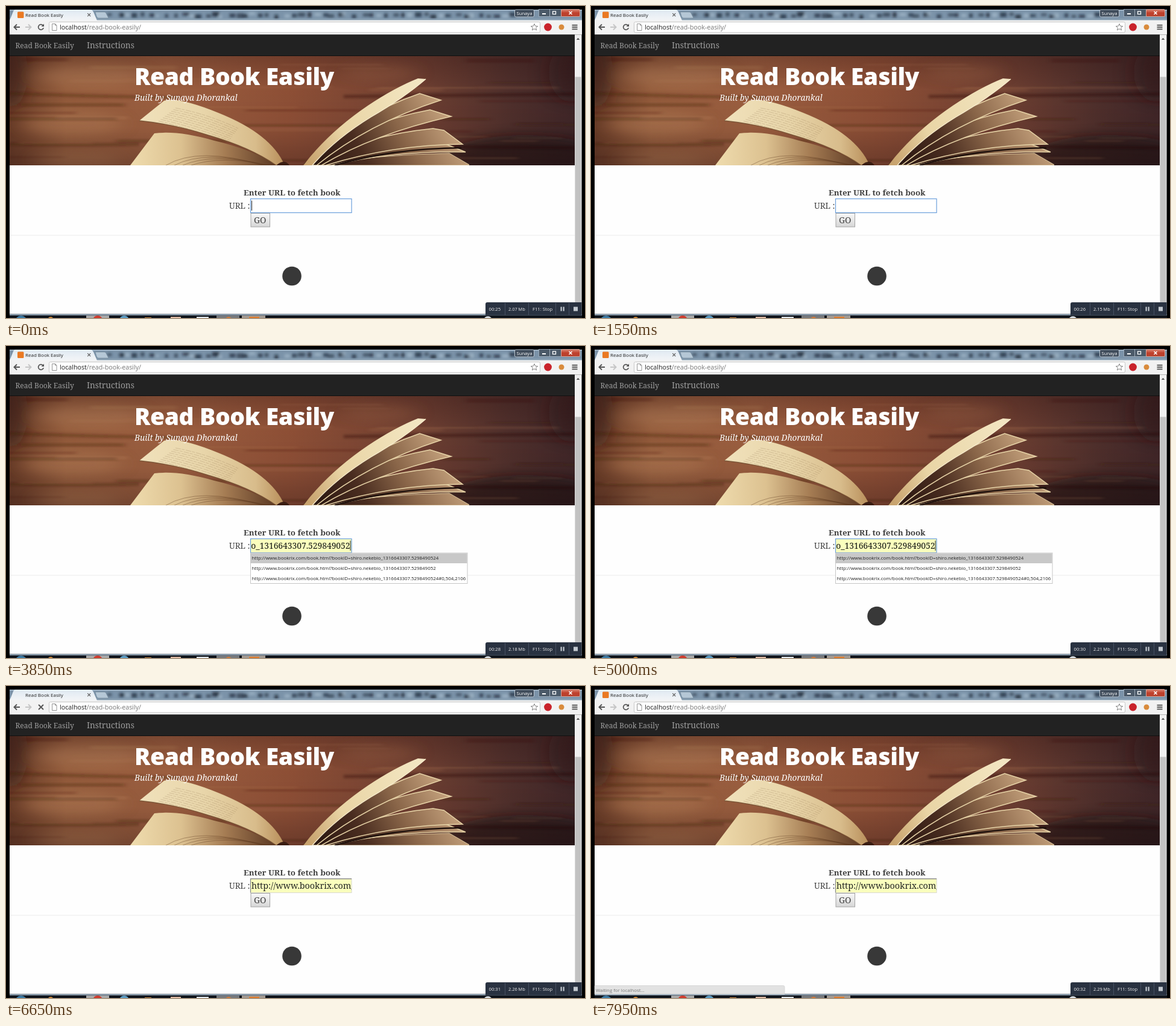
Write an HTML page that moves like this. It is 960x517 px and loops after 8000 ms.

```html
<!DOCTYPE html>
<html lang="en">
<head>
<meta charset="utf-8">
<title>Read Book Easily</title>
<style>
html, body { margin: 0; width: 100%; height: 100%; overflow: hidden; background: #000; }
svg { display: block; width: 100vw; height: 100vh; }
text { white-space: pre; }
.serif { font-family: "Noto Serif", serif; }
.ui { font-family: "Open Sans", sans-serif; }
</style>
</head>
<body>
<svg id="stage" viewBox="0 0 960 517" preserveAspectRatio="none"></svg>
<script>
const LOOP = 8000;
const $ = id => document.getElementById(id);

let seed = 11;
const rnd = () => (seed = seed * 16807 % 2147483647) / 2147483647;
const span = (a, b) => a + rnd() * (b - a);

const rect = (x, y, w, h, fill, more = '') =>
  `<rect x="${x}" y="${y}" width="${w}" height="${h}" fill="${fill}" ${more}/>`;
const disc = (x, y, r, fill) => `<circle cx="${x}" cy="${y}" r="${r}" fill="${fill}"/>`;
const blob = (x, y, rx, ry, fill, alpha) =>
  `<ellipse cx="${x}" cy="${y}" rx="${rx}" ry="${ry}" fill="${fill}" opacity="${alpha}"/>`;
const path = (d, fill, more = '') => `<path d="${d}" fill="${fill}" ${more}/>`;
const line = (d, stroke, w = 1, more = '') =>
  `<path d="${d}" fill="none" stroke="${stroke}" stroke-width="${w}" ${more}/>`;
const text = (x, y, size, str, fill, font = 'ui', more = '') =>
  `<text x="${x}" y="${y}" font-size="${size}" fill="${fill}" class="${font}" ${more}>${str}</text>`;
const grad = (id, stops, coords) =>
  `<linearGradient id="${id}" ${coords}>` + stops.map(([o, c, a = 1]) =>
    `<stop offset="${o}" stop-color="${c}" stop-opacity="${a}"/>`).join('') + '</linearGradient>';
const repeat = (n, make) => Array.from({ length: n }, (_, i) => make(i)).join('');

const across = 'x1="0" y1="0" x2="1" y2="0"';
const down = 'x1="0" y1="0" x2="0" y2="1"';
const fan = 'gradientUnits="userSpaceOnUse" x1="505" y1="264" x2="720" y2="150"';

const defs = `<defs>
  ${grad('wood', [[0, '#6a3d28'], [.1, '#935c3c'], [.28, '#9c5f40'], [.5, '#8d4f36'],
    [.72, '#704032'], [.88, '#50302c'], [1, '#3f2628']], across)}
  ${grad('dusk', [[0, '#2a1010', .28], [.3, '#2a1010', 0], [.65, '#1d0c10', .04], [1, '#1d0c10', .3]], down)}
  ${grad('leafL', [[0, '#f0e1bb'], [.45, '#e8d5a9'], [.8, '#d8bc8b'], [1, '#b78d59']], across)}
  ${grad('stackL', [[0, '#efdcae'], [.35, '#dcc190'], [.65, '#a57c53'], [1, '#5a3722']], across)}
  ${grad('leafR', [[0, '#c8a36e'], [.3, '#e9d5a5'], [1, '#f4e8c6']], fan)}
  ${grad('under', [[0, '#26140f'], [.35, '#4a2d20'], [.65, '#8a6649'], [1, '#c7a47f']], fan)}
  ${grad('button', [[0, '#f8f8f8'], [1, '#d6d6d6']], down)}
  ${grad('close', [[0, '#d98a78'], [.5, '#c0402c'], [1, '#b5412e']], down)}
  ${grad('tab', [[0, '#dfe9f2'], [1, '#f3f5f7']], down)}
  <filter id="soft"><feGaussianBlur stdDeviation="2"/></filter>
  <filter id="haze" x="-20%" y="-200%" width="140%" height="500%"><feGaussianBlur stdDeviation="5 1.2"/></filter>
  <filter id="glow" x="-50%" y="-50%" width="200%" height="200%"><feGaussianBlur stdDeviation="16 9"/></filter>
  <clipPath id="barClip"><rect x="6" y="6" width="949" height="18"/></clipPath>
  <clipPath id="photoClip"><rect x="6" y="83" width="937" height="181"/></clipPath>
  <clipPath id="fieldClip"><rect x="407" y="320" width="165.5" height="22"/></clipPath>
  <clipPath id="taskClip"><rect x="6" y="513" width="949" height="4"/></clipPath>
</defs>`;

function titleBar() {
  const blots = repeat(52, i => rect(172 + i * 13 + span(-4, 4), span(10, 15), span(5, 12), span(4, 8),
    ['#2b3a4b', '#141d29', '#a3b8ca', '#1d2938'][i % 4], 'opacity=".75"'));
  return `<g clip-path="url(#barClip)">${rect(6, 6, 949, 18, '#7b93a9')}
    <g filter="url(#soft)">${blots}</g>${rect(6, 6, 949, 1.5, '#a9bccc')}
    ${rect(6, 20.5, 949, 3.5, '#8ba1b4', 'opacity=".7"')}</g>`
  + path('M6 24 L12 9 Q13 6 16 6 H140 Q143 6 145 10 L151 24Z', 'url(#tab)')
  + path('M148 10 H163 Q165 10 166 12 L170 20 H153 Q151 20 150 17Z', '#b5c7d6', 'stroke="#6c8193" stroke-width=".6"')
  + rect(19, 9.5, 10.5, 10.5, '#ea7a24', 'id="favicon" rx="1.5"')
  + line('M28 14.5 A4 4 0 1 1 24 10.5', '#9aa6b0', 1.3, 'id="spinner"')
  + text(32, 17.5, 8, 'Read Book Easily', '#222')
  + line('M135.2 12.2 l5 5 m0 -5 l-5 5', '#555', 1.1)
  + rect(843.5, 6, 32, 12, '#3f4c5b', 'rx="2" stroke="#b9c4ce"')
  + text(859.5, 15, 7.6, 'Sunaya', '#fff', 'ui', 'text-anchor="middle"')
  + rect(883.5, 5.5, 18, 12, '#4b5a69', 'stroke="#a9b6c2" stroke-width=".8"')
  + rect(901.5, 5.5, 19, 12, '#4b5a69', 'stroke="#a9b6c2" stroke-width=".8"')
  + rect(920.5, 5.5, 31, 12, 'url(#close)', 'rx="1.5" stroke="#dcb8ae" stroke-width=".8"')
  + rect(889, 12, 6, 2, '#fff') + rect(906.5, 9, 5, 4.5, 'none', 'stroke="#fff" stroke-width="1.3"')
  + line('M933.5 9 l5 5 m0 -5 l-5 5', '#fff', 1.6);
}

function toolBar() {
  return rect(6, 23.5, 949, 24, '#f2f2f2')
  + line('M23 35 H13.5 M18 30.5 L13.5 35 L18 39.5', '#555', 1.9)
  + line('M32 35 H41.5 M37 30.5 L41.5 35 L37 39.5', '#c6c6c6', 1.9)
  + `<g id="reload">${line('M61.3 32 A4.4 4.4 0 1 0 62.2 36.3', '#555', 1.7)}${path('M63 29.5 V34 H58.5Z', '#555')}</g>`
  + line('M54 31 l8 8 m0 -8 l-8 8', '#555', 1.9, 'id="stop"')
  + rect(71.5, 26.5, 814, 17.5, '#fff', 'rx="2" stroke="#c6c6c6"')
  + line('M76.5 29.5 H81.5 L84 32 V40.5 H76.5Z M81.5 29.5 V32 H84', '#888', .9)
  + text(89, 38.6, 10.7, '<tspan fill="#222">localhost</tspan>/read-book-easily/', '#777')
  + line('M876 29.5 l1.6 3.7 4 .3 -3 2.6 1 3.9 -3.6 -2.1 -3.6 2.1 1 -3.9 -3 -2.6 4 -.3Z', '#777', .9)
  + disc(898.5, 35, 6.4, '#c9232b') + disc(921, 35, 4.5, '#d98b3c')
  + repeat(3, i => rect(938.5, 30.8 + i * 3.3, 9, 1.9, '#555'));
}

function wood() {
  const grain = repeat(40, i => rect(span(-40, 880), span(84, 262), span(60, 220), span(2, 7),
    i % 2 ? '#3e1d16' : '#c08a60', `opacity="${span(.1, .25).toFixed(2)}"`));
  const seams = line('M6 145 Q160 150 290 152 M6 229 Q120 231 220 229', '#3c1c12', 2.5, 'opacity=".65"')
    + line('M560 150 L943 146 M740 233 L943 235', '#22100f', 3, 'opacity=".6"');
  const light = blob(140, 115, 90, 18, '#c28a62', .45) + blob(110, 195, 80, 22, '#b57f57', .45)
    + blob(120, 255, 70, 12, '#b98257', .45) + blob(620, 110, 60, 14, '#a56a4a', .35)
    + blob(6, 110, 30, 60, '#2a1512', .5) + blob(860, 250, 130, 36, '#1f1118', .6)
    + blob(940, 110, 40, 50, '#2a1719', .45);
  return rect(6, 83, 937, 181, 'url(#wood)') + `<g filter="url(#glow)">${light}</g>
    <g filter="url(#haze)">${grain}</g><g filter="url(#soft)">${seams}</g>`
    + rect(6, 83, 937, 181, 'url(#dusk)');
}

function book() {
  const edge = (w = 1.5) => `stroke="#e6d2a6" stroke-width="${w}"`;
  const left = path('M206 264 L246 211 Q285 206 345 223 Q410 238 448 264Z', 'url(#stackL)')
    + repeat(4, i => line(`M${265 + i * 14} 264 Q${320 + i * 12} ${232 + i * 5} ${425 + i * 4} 264`, '#5b3820', 1, 'opacity=".4"'))
    + path('M221 190 L262 157 Q285 150 352 177 Q440 212 462 264 H448 Q405 234 335 214 Q280 196 221 190Z', 'url(#leafL)')
    + line('M221 190 Q280 196 335 214 Q405 234 448 264', '#6f4a2c', 1.4, 'opacity=".8"')
    + repeat(9, i => line(`M${281 - i * 3.5} ${169 + i * 2.7} Q${335 - i * 3} ${179 + i * 3.2} ${385 - i * 2} ${203 + i * 2.8}`,
      '#8a6a48', .7, 'opacity=".38" stroke-dasharray="9 1.5 5 2"'));
  const right = path('M505 264 Q620 246 735 244 L768 263 L766 264Z', 'url(#under)', edge(.9))
    + path('M503 264 Q620 222 722 226 L762 242 Q640 240 540 264Z', 'url(#under)', edge())
    + path('M503 264 Q590 215 708 203 L726 206 L757 229 Q640 230 530 264Z', 'url(#under)', edge())
    + line('M545 264 Q640 236 755 235', '#1f110d', 2.4)
    + path('M501 264 Q580 195 703 172 L738 183 Q610 212 523 264Z', 'url(#under)', edge())
    + path('M499 264 Q570 185 686 145 L721 156 Q600 195 515 264Z', 'url(#under)', edge())
    + path('M493 264 Q535 209 600 165 Q645 135 683 120 L696 121 Q660 152 605 184 Q545 221 508 264Z', 'url(#leafR)')
    + line('M696 121 Q660 152 605 184 Q545 221 508 264', '#f6ebcc', 1.4);
  return left + path('M448 264 Q462 252 470 264 H493 Q500 250 506 264Z', '#3a1d12') + right;
}

function page() {
  return rect(6, 83, 937, 427.5, '#fefefe') + rect(6, 47.5, 937, 36, '#222')
  + rect(6, 82, 937, 1.3, '#101010')
  + text(15.5, 70, 12, 'Read Book Easily', '#9d9d9d', 'serif')
  + text(134, 70, 13.7, 'Instructions', '#9d9d9d', 'serif')
  + `<g clip-path="url(#photoClip)">${wood()}${book()}</g>`
  + text(213, 131, 39, 'Read Book Easily', '#fff', 'ui', 'font-weight="800" letter-spacing="-.4"')
  + text(213, 157, 13.7, 'Built by Sunaya Dhorankal', '#fff', 'serif', 'font-style="italic"')
  + text(394, 314, 13.3, 'Enter URL to fetch book', '#404040', 'serif', 'font-weight="700"')
  + text(370, 335.6, 13.5, 'URL :', '#404040', 'serif')
  + rect(406, 343.5, 31.5, 22.5, 'url(#button)', 'stroke="#a3a3a3"')
  + text(411, 359.5, 14, 'GO', '#404040', 'serif')
  + rect(6, 379.5, 937, 1, '#ececec')
  + disc(474, 447.5, 15.8, '#383838')
  + rect(943, 47.5, 11.5, 463, '#f0f0f0') + rect(943.5, 117.5, 10, 380, '#c2c2c2')
  + path('M945.8 56 h5.4 l-2.7 -3.2Z', '#555');
}

function field() {
  return rect(405.5, 319.5, 167.5, 23, '#fff', 'id="box"')
  + line('M405.5 342.5 V319.5 H573', '#8a8a8a', 1.3, 'id="inset"')
  + '<g clip-path="url(#fieldClip)">'
  + text(570.5, 335.6, 13.8, 'o_1316643307.529849052', '#404040', 'serif', 'id="tail" text-anchor="end"')
  + text(407, 335.6, 14.3, 'http://www.bookrix.com/book.html', '#222', 'serif', 'id="head"') + '</g>'
  + rect(407, 322.5, 1, 16.5, '#222', 'id="caret"');
}

function dropdown() {
  const base = 'http://www.bookrix.com/book.html?bookID=shiro.nekebio_1316643307.529849052';
  return `<g id="list">${rect(405.5, 343, 359.5, 50.5, '#fff', 'stroke="#c6c6c6"')}
    ${rect(406, 343.5, 358.5, 16.5, '#c8c8c8')}
    ${['4', '', '4#0,504,2106'].map((end, i) => text(407.5, 354.4 + i * 16.7, 7.9, base + end, '#222')).join('')}</g>`;
}

function bottom() {
  const icons = disc(25, 523, 10, '#3c7ba5') + disc(74, 520, 5, '#c98331')
    + rect(133, 513, 38, 5, '#a9a9a9') + disc(152, 521, 8, '#d0392b') + disc(196, 521, 8, '#5c9cc4')
    + rect(230, 516, 11, 4, '#c8863c') + rect(273, 515, 17, 4, '#dcb7a2') + rect(316, 515, 20, 4, '#dfe6ec')
    + rect(349, 513, 38, 5, '#77797c') + disc(369, 521, 6, '#d87a35')
    + rect(391, 513, 39, 5, '#a29a92') + rect(403, 515, 17, 4, '#e07b2c') + disc(799, 521, 7, '#d5dbe0');
  return rect(6, 510.5, 949, 7, '#0e131a') + rect(6, 510.5, 949, 2, '#a8bccd')
  + `<g clip-path="url(#taskClip)">${icons}</g>`
  + `<g id="status">${path('M6 496.5 H319 Q321 496.5 321 499 V510.5 H6Z', '#e2e2e2', 'stroke="#cfcfcf" stroke-width=".7"')}
    ${text(8, 507, 7.8, 'Waiting for localhost...', '#777')}</g>`
  + path('M795 512.5 V494 Q795 491 798 491 H954.5 V512.5Z', '#293241')
  + [827, 866, 911, 933].map(x => rect(x, 492, 1, 20, '#465062')).join('')
  + text(800.5, 505, 7.7, '', '#eee', 'ui', 'id="clock"')
  + text(833, 505, 7.5, '', '#eee', 'ui', 'id="size"')
  + text(873, 505, 7.7, 'F11: Stop', '#eee')
  + rect(919.5, 498.5, 2.2, 7, '#c3c9d0') + rect(923.5, 498.5, 2.2, 7, '#c3c9d0')
  + rect(941, 498.5, 7, 7, '#c3c9d0');
}

$('stage').innerHTML = defs + rect(0, 0, 960, 517, '#000')
  + titleBar() + toolBar() + page() + field() + dropdown() + bottom();

// [start time, value]
const seconds = [[0, 25], [950, 26], [1950, 27], [2900, 28], [3950, 29], [4950, 30], [6000, 31], [7000, 32]];
const megabytes = [[0, 2.07], [950, 2.09], [1250, 2.13], [1500, 2.15], [1950, 2.16], [2400, 2.17],
  [3400, 2.18], [3950, 2.19], [4450, 2.2], [4950, 2.21], [6000, 2.23], [6500, 2.26], [7000, 2.27], [7600, 2.29]];
const blinks = [[0, 150], [650, 1200], [1800, 2250], [2850, 3350]];

const valueAt = (steps, t) => steps.reduce((v, [at, next]) => t >= at ? next : v, 0);
const within = (t, a, b) => t >= a && t < b;
const set = (id, name, value) => $(id).setAttribute(name, value);
const show = (id, on) => set(id, 'visibility', on ? 'visible' : 'hidden');

function update(t) {
  const pasted = t >= 3350, filled = t >= 3850, chosen = t >= 5800;
  const loading = within(t, 6450, 7800);

  set('box', 'fill', filled ? '#faffbd' : '#fff');
  set('box', 'stroke', chosen ? '#d9d9d0' : '#6c9fdb');
  set('box', 'stroke-width', chosen ? 1 : 1.2);
  show('inset', chosen);
  show('tail', pasted && !chosen);
  set('tail', 'fill', filled ? '#111' : '#404040');
  show('head', chosen);
  show('caret', blinks.some(([a, b]) => within(t, a, b)) || within(t, 3350, 5750));
  set('caret', 'x', pasted ? 570.5 : 407);

  show('list', within(t, 3850, 5800));
  set('list', 'opacity', t >= 5750 ? .5 : 1);

  show('favicon', !loading);
  show('reload', !loading);
  show('stop', loading);
  show('spinner', loading && t >= 6700);
  set('spinner', 'transform', `rotate(${-Math.floor(t / 50) * 24} 24 14.5)`);
  show('status', t >= 6850);

  $('clock').textContent = '00:' + valueAt(seconds, t);
  $('size').textContent = valueAt(megabytes, t).toFixed(2) + '\u2009Mb';
}

const start = performance.now();
function tick() {
  update((performance.now() - start) % LOOP);
  requestAnimationFrame(tick);
}
tick();
</script>
</body>
</html>
```
